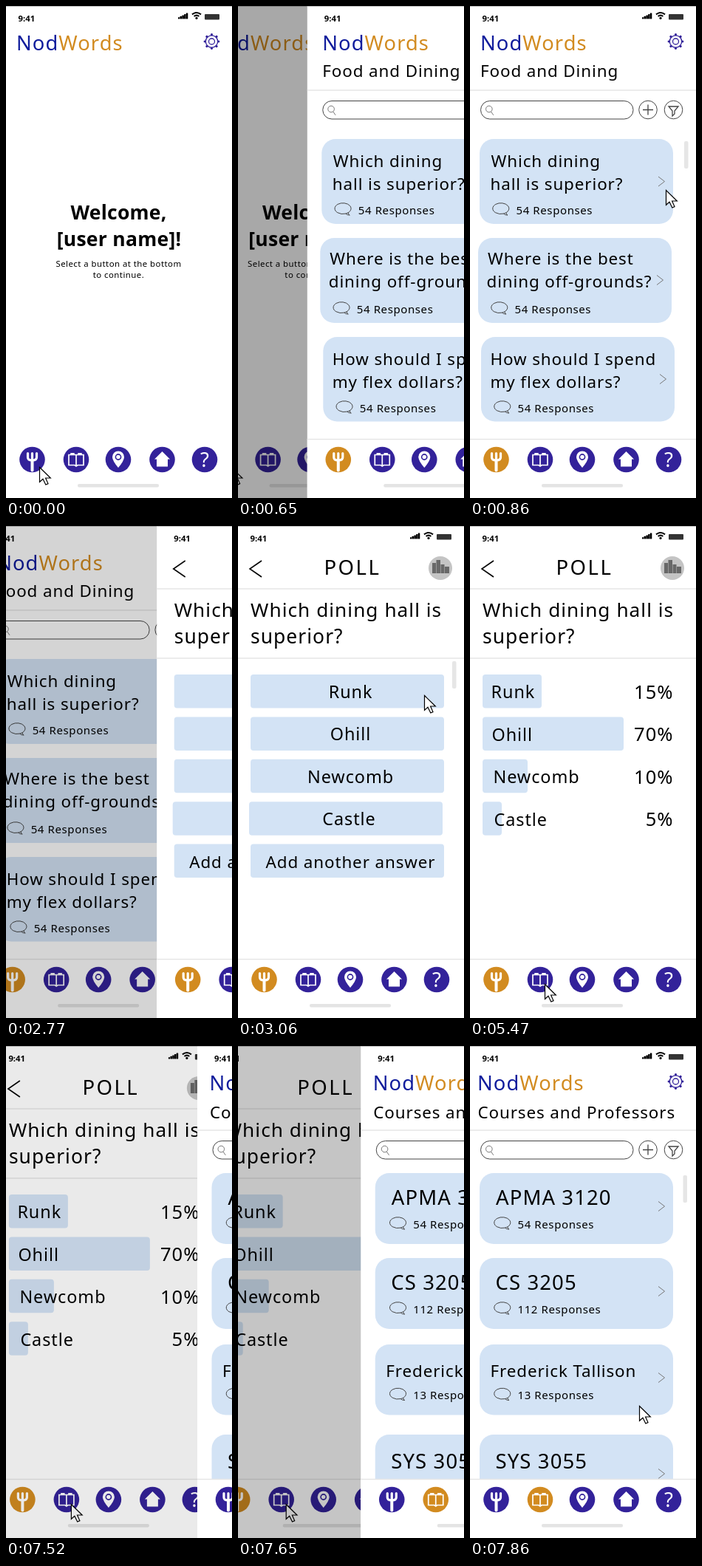
These frames come from a looping animation (306 by 666 pixels, 8000 ms). An HTML page:

```html
<!DOCTYPE html>
<html lang="en">
<head>
<meta charset="utf-8">
<title>Campus polls</title>
<style>
  html, body { margin: 0; width: 100%; height: 100%; overflow: hidden; background: #fff; }
  svg { display: block; width: 100%; height: 100%; }
  text { font-family: "Noto Sans", sans-serif; font-size: 22.4px; letter-spacing: .04em; fill: #000; white-space: pre; }
  .line { fill: none; stroke: #444; stroke-width: 1; }
  .soft { fill: none; stroke: #777; stroke-width: 1; }
  .thick { fill: none; stroke: #fff; stroke-linecap: round; }
  .rule { stroke: #e6e6e6; stroke-width: 1.5; }
  .box { fill: #d3e3f5; }
</style>
</head>
<body>
<svg id="stage" viewBox="0 0 306 666"></svg>
<script>
const LOOP = 8000, SLIDE = 340, WIDTH = 318, LEFT = -6.5;
const BLUE = '#101c9c', PURPLE = '#33229a', ORANGE = '#d28b20';

const text = (x, y, s, size = 22.4, extra = '') =>
  `<text x="${x}" y="${y}" style="font-size:${size}px;${extra}">${s}</text>`;
const centered = (x, y, s, size, extra = '') => text(x, y, s, size, 'text-anchor:middle;' + extra);
const rect = (x, y, w, h, r, attrs) =>
  `<rect x="${x}" y="${y}" width="${w}" height="${h}" rx="${r}" ${attrs}/>`;
const circle = (x, y, r, attrs) => `<circle cx="${x}" cy="${y}" r="${r}" ${attrs}/>`;
const path = (d, attrs) => `<path d="${d}" ${attrs}/>`;
const at = (x, y, s) => `<g transform="translate(${x} ${y})">${s}</g>`;
const rule = y => path(`M${LEFT} ${y}h${WIDTH}`, 'class="rule"');
const scrollbar = (x, y) => rect(x, y, 5.5, 37, 2, 'fill="#e6e6e6"');

const cursor = (x, y) => at(x, y, path('M.5 .5V20.3L5 16.3L8.8 24L12 22.6L8.6 15H15.3Z',
  'fill="#fff" stroke="#000" stroke-width="1.2"'));

function status() {
  const bars = [0, 1, 2, 3, 4].map(i =>
    rect(233 + i * 2.7, 15.2 - i * 1.4, 2.5, 2.2 + i * 1.4, .4, '')).join('');
  const wifi = [[6, 11.4], [3.4, 14]].map(([r, y]) =>
    path(`M${258 - r} ${y}q${r} ${-r * .8} ${r * 2} 0`, 'fill="none" stroke="#000" stroke-width="2"')).join('');
  return rect(LEFT, 0, WIDTH, 1, 0, 'fill="#bdbdbd"') +
    text(16.5, 20.5, '9:41', 11.3, 'font-weight:700;letter-spacing:0') + bars + wifi +
    circle(258, 16.4, 1.6, '') + rect(269, 11, 20, 7.5, 1, 'fill="#333"');
}

const logo = x => text(x, 60, `<tspan fill="${BLUE}">Nod</tspan><tspan fill="${ORANGE}">Words</tspan>`, 27.3);

function gear() {
  let teeth = '';
  for (let i = 0; i < 8; i++) {
    const a = i * Math.PI / 4;
    teeth += circle(9.3 * Math.cos(a), 9.3 * Math.sin(a), 1.6, `fill="${PURPLE}"`);
  }
  const ring = `fill="none" stroke="${PURPLE}" stroke-width="1.3"`;
  return at(278.5, 48, teeth + circle(0, 0, 8.2, ring) + circle(0, 0, 4, ring));
}

const icons = [
  [35.5, path('M-6 -8.5V-3Q-6 1 0 1Q6 1 6 -3V-8.5M0 -8.5V1', 'class="thick" stroke-width="3.2"') +
    path('M0 1V14.5', 'class="thick" stroke-width="4"')],
  [95, path('M-10 -6.5H10V7.5H2L0 9L-2 7.5H-10ZM0 -6V8', 'class="thick" stroke-width="1.7"') +
    path('M-7 -8h4M3 -8h4', 'class="thick" stroke-width="2"')],
  [152, path('M0 11Q-8 1.5 -8 -3.5A8 8 0 0 1 8 -3.5Q8 1.5 0 11Z', 'fill="#fff"') +
    circle(0, -3.5, 3.6, 'fill="#fff" stroke="currentColor" stroke-width="1.6"')],
  [211.5, path('M0 -11L10.5 -.5H7.5V9.5H-7.5V-.5H-10.5Z', 'fill="#fff"')],
  [269, centered(0, 9.5, '?', 27.5, 'fill:#fff;letter-spacing:0')]
];

const nav = active => (active < 0 ? '' : rect(LEFT, 586, WIDTH, 80, 0, 'fill="#fff"') + rule(586.5)) +
  icons.map(([x, art], i) => {
    const color = i === active ? ORANGE : PURPLE;
    return `<g color="${color}">` + at(x, 614, circle(0, 0, 17.3, `fill="${color}"`) + art) + '</g>';
  }).join('') +
  rect(97, 647, 110, 4.5, 2, 'fill="#e4e4e4"');

const search = () =>
  rect(14.5, 128.5, 206.5, 24.5, 12.2, 'class="line"') +
  circle(25.8, 139.5, 4.3, 'class="soft"') + path('M28.5 143l3.3 4.8', 'class="soft"') +
  circle(241, 140.5, 12.3, 'class="line"') + path('M234 140.5h14M241 133.5v14', 'class="line" style="stroke-width:1.3"') +
  circle(275.5, 140.5, 12.3, 'class="line"') +
  path('M269 136h13l-5 6v4l-3 3v-7z', 'class="line" style="stroke-width:1.3"');

const bubble = (x, y) => at(x, y,
  path('M-7 5.2A11 7.4 0 1 1 4 6.6Q6 8.6 9.5 8.6Q7.5 7.5 7.4 5.2M-7 5.2Q-2 8 4 6.6', 'class="line"'));

// A card: left, top, height, chevron y, responses, lines of [x, y, text, size]
const card = (x, y, h, chevron, replyX, replyY, count, lines) =>
  rect(x, y, 262, h, 19, 'class="box"') +
  lines.map(l => text(...l)).join('') +
  bubble(replyX - 21.5, replyY - 7.5) + text(replyX - .5, replyY - .5, count + ' Responses', 15, 'font-weight:500') +
  path(`M${x + 242} ${chevron - 6.5}l8.5 6.5l-8.5 6.5`, 'class="soft"');

const listTop = (x, title, titleX, titleY) =>
  status() + logo(x) + gear() + text(titleX, titleY, title) + rule(114) + search();

const welcome = () => status() + logo(14) + gear() +
  centered(152.5, 289, 'Welcome,', 26.5, 'font-weight:700;letter-spacing:.01em') +
  centered(153, 325, '[user name]!', 26.5, 'font-weight:700;letter-spacing:.01em') +
  centered(152.5, 352.5, 'Select a button at the bottom', 11.4) +
  centered(152.5, 367.5, 'to continue.', 11.4) +
  nav(-1) + cursor(45, 624);

const food = () => listTop(14, 'Food and Dining', 14, 96) +
  card(13, 180, 115, 237.5, 63, 282, 54, [[28.5, 218, 'Which dining'], [27.5, 249, 'hall is superior?']]) +
  card(11, 314, 115, 371, 61, 416, 54, [[24, 350, 'Where is the best'], [22.5, 381, 'dining off-grounds?']]) +
  card(15, 448, 114.5, 505, 65, 550, 54, [[27.5, 486, 'How should I spend'], [27.5, 517, 'my flex dollars?']]) +
  scrollbar(290, 183) + nav(0) + cursor(265, 249);

const pollTop = () => status() +
  path('M32 47L16 58L32 69', 'fill="none" stroke="#000" stroke-width="1.6"') +
  text(116.5, 66, 'POLL', 27.5, 'letter-spacing:.09em') +
  circle(274, 57, 16, 'fill="#c4c4c4"') +
  [[263, 50, 5], [268.5, 46, 5.5], [274.5, 52, 5], [280, 55, 6]].map(([x, y, w]) =>
    rect(x, y, w, 64 - y, 0, 'fill="#686868"')).join('') +
  rule(85) + text(17, 123, 'Which dining hall is', 26.2) + text(17, 159, 'superior?', 26.4) + rule(179);

const rowY = i => 201 + i * 57.4;
const answers = ['Runk', 'Ohill', 'Newcomb', 'Castle', 'Add another answer'];

const poll = () => pollTop() + answers.map((s, i) => {
  const shift = i === 3 ? -2 : 0;
  return rect(17 + shift, rowY(i), 262, 45.5, 4, 'class="box"') +
    centered(152.5 + shift, rowY(i) + 32, s, i === 4 ? 22.4 : 23.4);
}).join('') + scrollbar(290, 183) + nav(0) + cursor(252, 229);

const results = () => pollTop() +
  [[15, 80, 28.5], [70, 191, 29.5], [10, 61, 31.5], [5, 26, 32.5]].map(([share, w, x], i) =>
    rect(17, rowY(i), w, 45.5, 4, 'class="box"') +
    text(x, rowY(i) + 32.3, answers[i], 23.4) +
    text(275.5, rowY(i) + 33, share + '%', 25.5, 'text-anchor:end')).join('') +
  nav(0) + cursor(101, 620);

const courses = () => listTop(10, 'Courses and Professors', 10.5, 98) +
  card(13, 172, 96, 217, 65, 247, 54, [[35, 215, 'APMA 3120', 27.5]]) +
  card(13, 287, 96, 332, 65, 362, 112, [[34.5, 329.5, 'CS 3205', 27.5]]) +
  card(13, 404, 95.5, 449, 65, 478.5, 13, [[27.5, 448, 'Frederick Tallison']]) +
  card(13, 526, 96, 579, 65, 608, 27, [[34.5, 571.5, 'SYS 3055', 27.5]]) +
  scrollbar(288.5, 175) + nav(1) + cursor(229, 487);

const stage = document.getElementById('stage');
const screens = [welcome, food, poll, results, courses].map(draw => {
  const g = document.createElementNS('http://www.w3.org/2000/svg', 'g');
  g.innerHTML = rect(LEFT, 0, WIDTH, 666, 0, 'fill="#fff"') + draw() +
    rect(LEFT, 0, WIDTH, 666, 0, 'class="shade" opacity="0"');
  stage.append(g);
  return { g, shade: g.querySelector('.shade') };
});

// Each slide: its start, then the times at which the picture is refreshed
const slides = [
  [480, [500, 650, 720, 790, 860]],
  [2695, [2770, 2860, 2925, 2995, 3060]],
  [5114, [5200, 5260, 5330, 5400, 5470]],
  [7485, [7520, 7590, 7660, 7730, 7800, 7860]]
];

// cubic-bezier(0, 0, .58, 1)
function easeOut(x) {
  if (x >= 1) return 1;
  let lo = 0, hi = 1;
  for (let i = 0; i < 24; i++) {
    const s = (lo + hi) / 2;
    if (1.74 * s * s - .74 * s ** 3 < x) lo = s; else hi = s;
  }
  return 3 * lo * lo - 2 * lo ** 3;
}

function place(i, x, dim, shown) {
  const { g, shade } = screens[i];
  g.style.display = shown ? '' : 'none';
  g.setAttribute('transform', `translate(${x.toFixed(2)} 0)`);
  shade.setAttribute('opacity', dim.toFixed(3));
}

function render(t) {
  let top = 0, p = 1;
  slides.forEach(([start, steps], i) => {
    const step = steps.filter(s => s <= t).pop();
    if (step === undefined) return;
    top = i + 1;
    p = easeOut((step - start) / SLIDE);
  });
  screens.forEach((_, i) => {
    if (i === top) place(i, WIDTH * (1 - p), 0, true);
    else place(i, -WIDTH * p / 4, p / 2, i === top - 1 && p < 1);
  });
}

const begin = performance.now();
function tick() {
  render((performance.now() - begin) % LOOP);
  requestAnimationFrame(tick);
}
tick();
</script>
</body>
</html>
```
